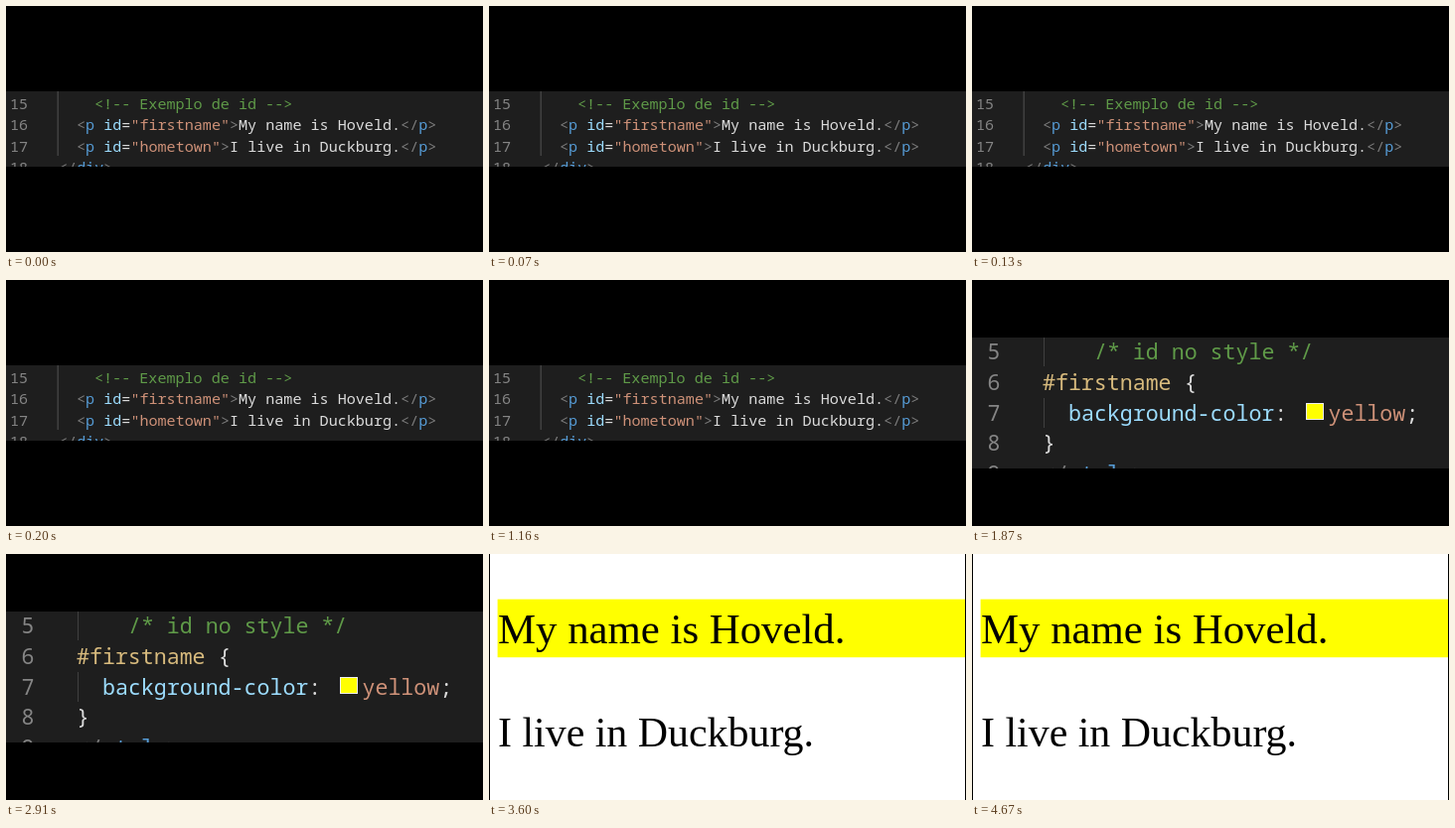
Animation, 480 px wide and 248 px high, one loop 5390 ms. Source, as an HTML page:

```html
<!DOCTYPE html>
<html lang="en">
<head>
<meta charset="utf-8">
<title>CSS id selector</title>
<style>
  html, body { margin: 0; width: 100%; height: 100%; overflow: hidden; background: #000; }
  svg { display: block; width: 100%; height: 100%; }
  text { white-space: pre; }
  .scene { visibility: hidden; animation: 5390ms step-end infinite; }
  #markup { animation-name: first; }
  #style { animation-name: second; }
  #page { animation-name: third; }
  /* cuts at 1800 ms and 3600 ms */
  @keyframes first { 0% { visibility: visible; } 33.395%, 100% { visibility: hidden; } }
  @keyframes second { 0% { visibility: hidden; } 33.395% { visibility: visible; } 66.790%, 100% { visibility: hidden; } }
  @keyframes third { 0% { visibility: hidden; } 66.790%, 100% { visibility: visible; } }

  .code { font-family: "Noto Sans Mono", monospace; fill: #dcdcdc; }
  #markup { font-size: 15.1px; }
  #style { font-size: 21.6px; }
  #page { font-family: "Liberation Serif", serif; fill: #000; }
  .soft { filter: blur(0.5px); }
  .panel { fill: #1e1e1e; }
  .guide { fill: #404040; }
  .num { fill: #858585; }
  .comment { fill: #5f9a48; }
  .punct { fill: #7c7c7c; }
  .tag { fill: #569cd6; }
  .attr { fill: #9cdcfe; }
  .str { fill: #ce9178; }
  .sel { fill: #d7ba7d; }
</style>
</head>
<body>
<svg viewBox="0 0 480 248" preserveAspectRatio="none">
  <defs>
    <clipPath id="markupClip"><rect y="86" width="480" height="76"/></clipPath>
    <clipPath id="styleClip"><rect y="58" width="480" height="132"/></clipPath>
  </defs>

  <g id="markup" class="scene code" clip-path="url(#markupClip)">
    <rect class="panel" y="86" width="480" height="76"/>
    <rect class="guide" x="51.5" y="86" width="1.5" height="65"/>
    <g class="num">
      <text x="4" y="104">15</text>
      <text x="4" y="125.3">16</text>
      <text x="4" y="146.8">17</text>
      <text x="4" y="168.3">18</text>
    </g>
    <text class="comment" x="89" y="104">&lt;!-- Exemplo de id --&gt;</text>
    <text x="71" y="125.3"><tspan class="punct">&lt;</tspan><tspan class="tag">p</tspan> <tspan class="attr">id</tspan>=<tspan class="str">"firstname"</tspan><tspan class="punct">&gt;</tspan>My name is Hoveld.<tspan class="punct">&lt;/</tspan><tspan class="tag">p</tspan><tspan class="punct">&gt;</tspan></text>
    <text x="71" y="146.8"><tspan class="punct">&lt;</tspan><tspan class="tag">p</tspan> <tspan class="attr">id</tspan>=<tspan class="str">"hometown"</tspan><tspan class="punct">&gt;</tspan>I live in Duckburg.<tspan class="punct">&lt;/</tspan><tspan class="tag">p</tspan><tspan class="punct">&gt;</tspan></text>
    <text x="53" y="168.3"><tspan class="punct">&lt;/</tspan><tspan class="tag">div</tspan><tspan class="punct">&gt;</tspan></text>
  </g>

  <g id="style" class="scene code" clip-path="url(#styleClip)">
    <rect class="panel" y="58" width="480" height="132"/>
    <path class="guide" d="M72 58h1v29h-1zM72 119h1v30h-1z"/>
    <g class="num">
      <text x="15.5" y="80">5</text>
      <text x="15.5" y="110.5">6</text>
      <text x="15.5" y="141.5">7</text>
      <text x="15.5" y="172">8</text>
      <text x="15.5" y="203">9</text>
    </g>
    <text class="comment" x="123" y="80">/* id no style */</text>
    <text x="71" y="110.5"><tspan class="sel">#firstname</tspan> {</text>
    <text x="97" y="141.5"><tspan class="attr">background-color</tspan>:</text>
    <rect x="336" y="124" width="18" height="17" fill="#eee"/>
    <rect x="337" y="125" width="16" height="15" fill="#ff0"/>
    <text x="358.5" y="141.5"><tspan class="str">yellow</tspan>;</text>
    <text x="71" y="172">}</text>
    <text x="71" y="203"><tspan class="punct">&lt;/</tspan><tspan class="tag">style</tspan><tspan class="punct">&gt;</tspan></text>
  </g>

  <g id="page" class="scene">
    <rect width="480" height="248"/>
    <rect x="1" width="478" height="248" fill="#fff"/>
    <rect x="8.6" y="45.6" width="470.4" height="58.6" fill="#ff0"/>
    <g class="soft">
      <text x="9" y="90" font-size="42.8">My name is Hoveld.</text>
      <text x="9" y="194" font-size="41.9">I live in Duckburg.</text>
    </g>
  </g>
</svg>
</body>
</html>
```
